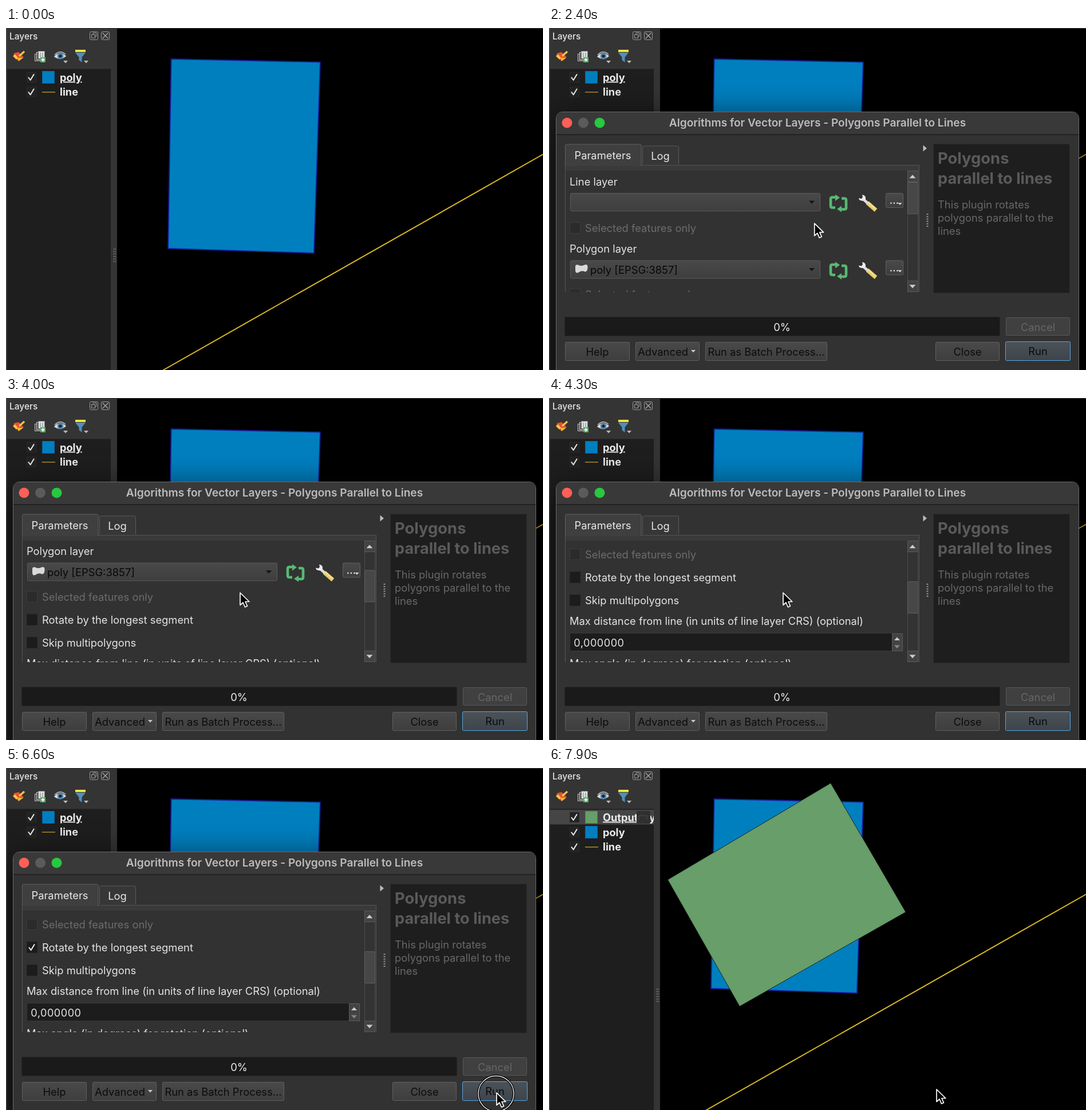
An HTML page for the animation above (8 s loop, 938 px wide and 597 px high).

```html
<!DOCTYPE html>
<html lang="en">
<head>
<meta charset="utf-8">
<title>Polygons parallel to lines</title>
<style>
  html, body { margin: 0; width: 100%; height: 100%; overflow: hidden; background: #000; }
  svg { display: block; width: 938px; height: 597px; font-family: Inter, Roboto, sans-serif; }
  #dialog { filter: drop-shadow(0 14px 30px #000b); }
</style>
</head>
<body>
<svg id="stage" viewBox="0 0 938 597" xmlns="http://www.w3.org/2000/svg"></svg>
<script>
const LOOP = 8000, STEP = 100, BODY = 18.35;
const $ = id => document.getElementById(id);

// Shape helpers
const rect = (x, y, w, h, fill, stroke = 'none', r = 0) =>
  `<rect x="${x}" y="${y}" width="${w}" height="${h}" rx="${r}" fill="${fill}" stroke="${stroke}"/>`;
const path = (d, fill = 'none', stroke = 'none', w = 1, attrs = '') =>
  `<path d="${d}" fill="${fill}" stroke="${stroke}" stroke-width="${w}" stroke-linejoin="round" ${attrs}/>`;
const circle = (x, y, r, fill, stroke = 'none', w = 1) =>
  `<circle cx="${x}" cy="${y}" r="${r}" fill="${fill}" stroke="${stroke}" stroke-width="${w}"/>`;
const group = (content, attrs = '') => `<g ${attrs}>${content}</g>`;
const at = (x, y, content) => group(content, `transform="translate(${x} ${y})"`);
// Text whose capitals are centred on y
const text = (x, y, str, fill = '#e4e4e4', size = BODY, weight = 400, attrs = '') =>
  `<text x="${x}" y="${y + size * .36}" fill="${fill}" font-size="${size}" font-weight="${weight}" ${attrs}>${str}</text>`;
const MID = 'text-anchor="middle"', LINE = 'text-decoration="underline"';
const down = (x, y, fill, s = 1) => path(`M${x - 5 * s} ${y - 2.5 * s}h${10 * s}l${-5 * s} ${5.5 * s}z`, fill);
const up = (x, y, fill, s = 1) => path(`M${x - 5 * s} ${y + 3 * s}h${10 * s}l${-5 * s} ${-5.5 * s}z`, fill);
const tick = (x, y) => path(`M${x - 5} ${y}l3.6 5l6.4 -10.5`, 'none', '#eee', 2);

// Layer panel
const layerRow = (y, name, swatch, underline) =>
  rect(36.5, y - 8.5, 16, 17, '#222', '#2c2c2c') + tick(44, y) + swatch +
  text(94, y, name, '#ececec', 18.2, 700, underline ? LINE : '');
const blueSwatch = y => rect(63.5, y - 10.5, 21, 21, '#007fbf', '#0f5fa8');
const greenSwatch = y => rect(63.5, y - 10.5, 21, 21, '#679e6a', '#55805a');
const lineSwatch = y => path(`M63 ${y + .5}h23`, 'none', '#b39a32', 1.4);

const toolbar =
  at(12, 40, path('M2 4l8-2l9 9l-9 7l-9-9z', '#e8502e') + path('M4 6l5 6l-3 3l-6-6z', '#f5c542') +
    path('M8 12l10 0l-8 6z', '#f2b632') + path('M11 9l9-8', 'none', '#f0c050', 3.5)) +
  at(50, 40, rect(.5, 5.5, 11, 12, '#444', '#bbb') + rect(3.5, 2.5, 11, 13, '#555', '#ccc') +
    rect(6.5, .5, 11, 13, '#dfe4e4', '#777') + path('M10 3v8M14 3v8', 'none', '#777') +
    rect(10, 11, 9, 9, '#55ad68') + path('M14.5 12.5v6M11.5 15.5h6', 'none', '#fff', 2)) +
  at(84, 40, path('M0 10Q10 -2 21 9Q11 18 0 10z', '#dde5ea', '#8a9ba8') + circle(11, 9, 5.5, '#5a87ab') +
    circle(11, 9, 2.6, '#15212c') + path('M1 7Q10 -3 20 6', 'none', '#bbb', 1.6) + down(20, 19, '#bbb', .8)) +
  at(121, 38, rect(0, 0, 18, 4, '#f5e63c') + path('M0 5h18l-6.5 8v9l-5-4v-5z', '#4f8fbd') + down(19, 21, '#bbb', .8));

const panel =
  rect(0, 0, 194, 597, '#343434') + rect(1, 72, 182, 525, '#1e1e1e') + rect(0, 0, 1.5, 597, '#4a4a4a') +
  rect(1, 71, 183, 1, '#292929') + text(6, 14, 'Layers', '#e6e6e6', 15.5, 500) +
  rect(146.5, 6.5, 14, 14, 'none', '#999', 2) + rect(149.5, 11.5, 6, 6, 'none', '#999') +
  path('M152 11v-2.5h6v6h-2', 'none', '#999') +
  rect(166.5, 6.5, 14, 14, 'none', '#999', 2) + path('M168.5 8.5l10 10m0 -10l-10 10', 'none', '#aaa', 1.3) +
  toolbar + path('M188.5 385v24M191 385v24', 'none', '#858585', 1.2, 'stroke-dasharray="2 2.3"');

const layersBefore = layerRow(86, 'poly', blueSwatch(86), true) + layerRow(111.5, 'line', lineSwatch(111.5));
const layersAfter = rect(1, 73, 182, 25.5, '#454545') + layerRow(86, 'Output layer', greenSwatch(86), true) +
  rect(153, 75, 24, 22, '#303030', 'none', 3) + path('M157 90v-7h14v7', 'none', '#4a4a4a') +
  layerRow(112, 'poly', blueSwatch(112)) + layerRow(137.5, 'line', lineSwatch(137.5));

const map = rect(194, 0, 744, 597, '#000') + rect(194, 0, 744, 1.3, '#333') +
  path('M288.5 54L549 59.5L538 393L283 385z', '#007fbf', '#171c96', 1.9) +
  group(path('M492 26.5L623 251.5L333 416L207.5 195z', '#679e6a', '#1b261b'), 'id="result"') +
  path('M274 597.5L938 220.5', 'none', '#dfbd22', 1.9);

// Dialog parts
const button = (x, y, w, h, label, shift = 0) =>
  rect(x + .5, y + .5, w - 1, h - 1, 'url(#face)', '#606060', 2) +
  text(x + w / 2 + shift, y + h / 2 + .5, label, '#0c0c0c', BODY, 400, MID);
const lineIcon = path('M4 2L10 18L17 3L22 1', 'none', '#999', 1.3) +
  [[3, 2], [10, 18], [16, 4], [21, 2]].map(p => circle(...p, 1.8, '#bbb')).join('');
const polyIcon = path('M1 4Q1 0 6 1Q11 4 17 1Q23 -1 22.5 6Q22 13 18 13Q12 10 7 14Q1 17 1 10z', '#d9d9d9');
const iterate = path('M12 3H5Q2 3 2 6V18Q2 21 5 21H10M19 24H26Q29 24 29 21V8Q29 5 26 5H21', 'none', '#58b873', 4.6) +
  path('M10 -2l8 5.5l-8 6zM21 18l-8 5.5l8 5.5z', '#58b873');
const wrench = path('M15 14L30 27', 'none', '#e8cc6a', 7) + path('M17 14L29 25', 'none', '#f6e3a0', 2) +
  path('M7 7L16 15', 'none', '#ddd', 5) + path('M6 0Q13 1 12 8Q8 13 1 9L0 6L5 7L7 4z', '#ececec');
const combo = (y, icon, name, id) =>
  rect(37.5, y + .5, 436, 31, 'url(#face)', '#5a5a5a', 2) + down(459, y + 16, '#151515') +
  group(at(45, y + 7, icon) + text(72, y + 16.5, name, '#080808'), `id="${id}"`) +
  at(490, y + 4.5, iterate) + at(541, y + 3, wrench) +
  rect(588.5, y + .5, 30, 25, 'url(#face)', '#606060', 2) +
  text(603, y + 13, '...', '#eee', 17, 600, MID) + down(613, y + 19, '#ddd', .7);
const check = (y, label, enabled = true, extra = '') =>
  rect(36.5, y - 9.5, 18, 19, enabled ? '#1c1c1c' : '#2b2b2b', enabled ? '#222' : '#3c3c3c') + extra +
  text(63, y, label, enabled ? '#e4e4e4' : '#6c6c6c');

const form =
  text(36, 268, 'Line layer') + combo(288, lineIcon, 'line [EPSG:3857]', 'picked') +
  check(349, 'Selected features only', false) +
  text(36, 385, 'Polygon layer') + combo(405.5, polyIcon, 'poly [EPSG:3857]', 'polygon') +
  check(465, 'Selected features only', false) +
  check(505, 'Rotate by the longest segment', true, group(tick(45, 505), 'id="tick"')) +
  check(545, 'Skip multipolygons') +
  text(36, 581, 'Max distance from line (in units of line layer CRS) (optional)') +
  rect(36.5, 602.5, 581, 31, '#1c1c1c', '#383838', 2) +
  text(43, 619, '0,000000', '#e4e4e4', BODY, 400, 'font-variant-numeric="tabular-nums" style="font-variant-numeric:tabular-nums"') +
  rect(599.5, 603.5, 18, 30, '#434343', '#5a5a5a') + up(608, 612, '#ccc') + down(608, 626, '#888') +
  text(36, 655, 'Max angle (in degrees) for rotation (optional)');

const dialog =
  rect(12.5, 146.5, 913, 470, '#323232', '#6b6b6b', 11) +
  path('M13 186V158Q13 147 24 147H914Q925 147 925 158V186z', '#393939') + rect(13, 185.5, 912, 1.2, '#161616') +
  circle(31.5, 165.5, 9, '#ff5f57') + circle(60, 165.5, 9, '#5b5b5b') + circle(88.5, 165.5, 9, '#28c840') +
  text(469, 165, 'Algorithms for Vector Layers - Polygons Parallel to Lines', '#bcbcbc', 19.1, 600, MID) +
  // tabs
  rect(28, 240, 619, 221, '#323232') + rect(28, 239, 619, 10, '#3a3a3a') +
  path('M28.5 461V239.5H646.5V461', 'none', '#555') +
  path('M163.5 238V208Q163.5 206 165.5 206H224.5Q226.5 206 226.5 208V238', '#373737', '#5a5a5a') +
  path('M28.5 241V205.5Q28.5 203 31 203H158.5Q161 203 161 205.5V241', '#3f3f3f', '#606060') +
  text(94, 222, 'Parameters', '#e8e8e8', BODY, 400, MID) + text(194.5, 223, 'Log', '#e8e8e8', BODY, 400, MID) +
  group(group(form, 'id="form"'), 'clip-path="url(#view)"') +
  // scrollbar
  rect(626.5, 249.5, 18, 211, '#333', '#4c4c4c') +
  rect(626.5, 249.5, 18, 19, '#434343', '#5a5a5a') + up(635, 259, '#ccc', 1.1) +
  rect(626.5, 441.5, 18, 19, '#434343', '#5a5a5a') + down(635, 451, '#ccc', 1.1) +
  group(rect(626.5, 269.5, 18, 55, '#474747', '#606060', 1), 'id="thumb"') +
  // help pane
  path('M653.5 204.5v11l6.5 -5.5z', '#bbb') +
  path('M661 324v25', 'none', '#909090', 3, 'stroke-dasharray="2 2.2"') +
  rect(671.5, 202.5, 238, 260, '#1e1e1e', '#2c2c2c') +
  text(679, 227, 'Polygons', '#5a5a5a', 27.4, 700) + text(679, 262.5, 'parallel to lines', '#5a5a5a', 27.2, 700) +
  ['This plugin rotates', 'polygons parallel to the', 'lines']
    .map((s, i) => text(679, 308.5 + i * 22.8, s, '#686868')).join('') +
  // footer
  rect(27.5, 504.5, 760, 33, '#1a1a1a', '#262626', 2) + text(407, 522, '0%', '#ececec', BODY, 400, MID) +
  rect(798.5, 505.5, 111, 31, '#404040', '#585858', 2) + text(854, 522, 'Cancel', '#666', BODY, 400, MID) +
  button(28, 548, 113, 33, 'Help') + button(151, 548, 112, 33, 'Advanced', -8) +
  down(252, 564, '#c8c8c8', .8) + button(273, 548, 213, 33, 'Run as Batch Process...') +
  button(675, 548, 112, 33, 'Close') +
  rect(797.5, 547.5, 113, 33, 'url(#active)', '#58a6e4', 2) + text(854, 564.5, 'Run', '#0b0b0b', BODY, 400, MID);

const gradient = (id, a, b) =>
  `<linearGradient id="${id}" x2="0" y2="1"><stop stop-color="${a}"/><stop offset="1" stop-color="${b}"/></linearGradient>`;

$('stage').innerHTML =
  `<defs>${gradient('face', '#494949', '#3e3e3e')}${gradient('active', '#4b5258', '#3d444b')}
   <clipPath id="view">${rect(30, 250, 596, 211)}</clipPath><clipPath id="list">${rect(0, 72, 183, 525)}</clipPath></defs>` +
  map + panel +
  group(group(layersBefore, 'id="before"') + group(layersAfter, 'id="after"'), 'clip-path="url(#list)"') +
  group(dialog, 'id="dialog"') +
  group(
    group(circle(-1, 1.5, 31, 'none', '#000', 4) + circle(-1, 1.5, 31, 'none', '#e8e8e8', 1.5), 'id="ring"') +
    path('M0 0V21.5L5 17L8.5 25L12.5 23.3L9 15.5H15.8z', '#000', '#fff', 1.7), 'id="cursor"');

// Motion: [time, ...values]
const cursorPath = [[1800, 700, 520], [2600, 420, 308], [2800, 420, 308], [3100, 408, 304], [3200, 408, 304],
  [3500, 409, 340], [4500, 409, 340], [5100, 301, 316.5], [5600, 301, 316.5], [6500, 857, 567],
  [7300, 857, 567], [7700, 677, 561]];
const scrollPath = [[3700, 0], [4000, 118], [4300, 192]];
const clicks = [[2700, 2800], [5200, 5300], [6600, 6700], [7700, 7900]];

const smooth = k => k * k * (3 - 2 * k);
function sample(keys, t, ease = k => k) {
  const i = keys.findIndex(key => key[0] > t);
  if (i < 0) return keys.at(-1).slice(1);
  if (!i) return keys[0].slice(1);
  const a = keys[i - 1], b = keys[i], k = ease((t - a[0]) / (b[0] - a[0]));
  return a.slice(1).map((v, j) => v + (b[j + 1] - v) * k);
}
const show = (id, on) => $(id).setAttribute('display', on ? 'inline' : 'none');
const move = (id, x, y) => $(id).setAttribute('transform', `translate(${x} ${y})`);

function draw(now) {
  const t = Math.floor((now % LOOP) / STEP) * STEP;
  const [scroll] = sample(scrollPath, t);
  move('form', 0, -scroll);
  move('thumb', 0, scroll * .266);
  move('cursor', ...sample(cursorPath, t, smooth));
  show('dialog', t >= 1000 && t < 7900);
  show('picked', t >= 3000);
  show('tick', t >= 5200);
  show('before', t < 6800);
  show('after', t >= 6800);
  show('result', t >= 6800);
  show('cursor', t >= 1800);
  show('ring', clicks.some(([a, b]) => t >= a && t < b));
}

const start = performance.now();
function loop() {
  draw(performance.now() - start);
  requestAnimationFrame(loop);
}
loop();
</script>
</body>
</html>
```
